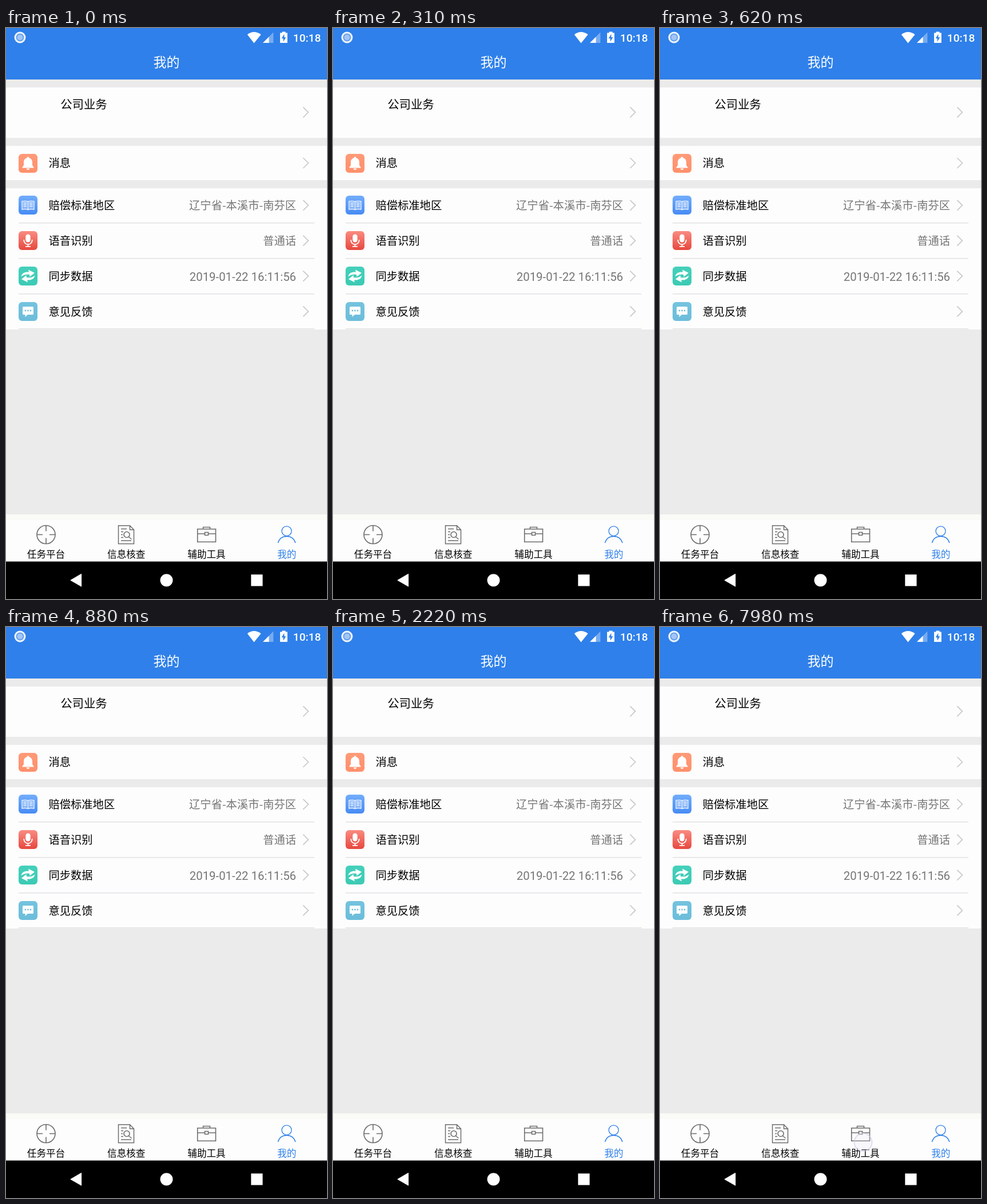
Write an HTML page with a canvas that moves like this. It is 561 px wide and 998 px high and loops after 8000 ms.

```html
<!DOCTYPE html>
<html lang="zh-CN">
<head>
<meta charset="utf-8">
<style>
html, body { margin: 0; width: 100%; height: 100%; overflow: hidden; background: #000; }
canvas { display: block; }
</style>
</head>
<body>
<canvas id="stage" width="561" height="998"></canvas>
<script>
const ctx = document.getElementById('stage').getContext('2d');
const LOOP = 8000;
const CJK = '"Noto Sans CJK SC", "Noto Sans CJK", sans-serif';
const LATIN = 'Roboto, sans-serif';
const BLUE = '#2f80ea', WHITE = '#fdfdfd', GREY = '#ebebeb';

function rect(x, y, w, h, color) {
  ctx.fillStyle = color;
  ctx.fillRect(x, y, w, h);
}

function shape(d, color) {
  ctx.fillStyle = color;
  ctx.fill(new Path2D(d));
}

function line(d, color, width) {
  ctx.strokeStyle = color;
  ctx.lineWidth = width;
  ctx.stroke(new Path2D(d));
}

function disc(x, y, r, color) {
  ctx.beginPath();
  ctx.arc(x, y, r, 0, Math.PI * 2);
  ctx.fillStyle = color;
  ctx.fill();
}

function ring(x, y, r, color, width) {
  ctx.beginPath();
  ctx.arc(x, y, r, 0, Math.PI * 2);
  ctx.strokeStyle = color;
  ctx.lineWidth = width;
  ctx.stroke();
}

function text(str, x, centerY, size, color, align = 'left', family = CJK, weight = 400) {
  ctx.font = `${weight} ${size}px ${family}`;
  ctx.textAlign = align;
  ctx.fillStyle = color;
  ctx.fillText(str, x, centerY + size * (family === CJK ? 0.38 : 0.355));
}

function at(x, y, draw) {
  ctx.save();
  ctx.translate(x, y);
  draw();
  ctx.restore();
}

function statusBar() {
  disc(24.5, 16.5, 10, '#eff5fd');
  disc(24.5, 16.5, 6.9, '#649fef');
  disc(24.5, 16.5, 5, '#a3c5f5');
  shape('M433.5 26.5L421.8 11.6Q427 7 433.5 7T445.6 11.6Z', '#fff');
  shape('M449 26H467.3V7.5Z', 'rgba(255,255,255,.35)');
  shape('M449 26H459.5V15.4Z', '#fff');
  shape('M482.5 6.5H488.5V8.6H491.8V26H479V8.6H482.5Z', '#fff');
  shape('M486.3 10.5L481.6 18.2H484.6V24L489.3 16.3H486.3Z', BLUE);
  text('10:18', 550.3, 17.3, 19.1, '#fff', 'right', LATIN, 500);
}

const icons = {
  bell() {
    shape('M16.5 5Q18.2 5 18.3 7C22.5 8 24 11.5 24 15V20L26.5 23.5V24.5H6.5V23.5L9 20V15C9 11.5 10.5 8 14.7 7Q14.8 5 16.5 5ZM13.5 25.5H19.5Q18.8 28 16.5 28T13.5 25.5Z', '#fff');
  },
  book() {
    const pages = 'M16.5 10.5Q12 8.5 6 10V24Q12 22.8 16.5 24.5Q21 22.8 27 24V10Q21 8.5 16.5 10.5V24.5';
    shape(pages, 'rgba(255,255,255,.25)');
    line(pages + 'M8.5 13H14M8.5 16H14M8.5 19H14M19 13H24.5M19 16H24.5M19 19H24.5', '#e8f1ff', 1.4);
  },
  mic() {
    ctx.beginPath();
    ctx.roundRect(12.3, 5.5, 8.4, 14, 4.2);
    ctx.fillStyle = '#fff';
    ctx.fill();
    line('M9.3 15V16A7.2 7.2 0 0 0 23.7 16V15M16.5 23V26.5M12 26.8H21', '#fff', 1.8);
  },
  sync() {
    const arrow = 'M4.5 17.5C6 11 11 9 18 9.5L17 5.5L28 11L19.5 18L19 14C13 13 9 14 4.5 17.5Z';
    shape(arrow, '#fff');
    ctx.translate(33, 33);
    ctx.rotate(Math.PI);
    shape(arrow, '#fff');
  },
  chat() {
    shape('M8.5 8H24.5Q26 8 26 9.5V20.5Q26 22 24.5 22H16L11.5 26V22H8.5Q7 22 7 20.5V9.5Q7 8 8.5 8Z', '#fff');
    for (const x of [12, 16.5, 21]) disc(x, 15, 1.4, '#70c0dc');
  }
};

const rows = [
  { y: 236, icon: 'bell', from: '#ff9a78', to: '#ff906c', label: '消息' },
  { y: 309.8, icon: 'book', from: '#72adfc', to: '#478bf4', label: '赔偿标准地区', value: '辽宁省-本溪市-南芬区' },
  { y: 371.7, icon: 'mic', from: '#fa8c82', to: '#e6483e', label: '语音识别', value: '普通话' },
  { y: 433.6, icon: 'sync', from: '#45d0bb', to: '#3ccab4', label: '同步数据', value: '2019-01-22 16:11:56', latin: true },
  { y: 495.4, icon: 'chat', from: '#74c3de', to: '#6cbdda', label: '意见反馈' }
];

function chevron(y) {
  line(`M519.3 ${y - 9}L528.4 ${y}L519.3 ${y + 9}`, '#c9c9cc', 1.7);
}

function listRow({ y, icon, from, to, label, value, latin }) {
  at(22, Math.round(y - 16.5), () => {
    const fill = ctx.createLinearGradient(0, 0, 0, 33);
    fill.addColorStop(0, from);
    fill.addColorStop(1, to);
    ctx.beginPath();
    ctx.roundRect(0, 0, 33, 33, 6);
    ctx.fillStyle = fill;
    ctx.fill();
    icons[icon]();
  });
  text(label, 74.5, y, 19.3, '#000');
  if (value) {
    if (latin) text(value, 507, y + 1, 20.35, '#757575', 'right', LATIN);
    else text(value, 507, y, 19.3, '#757575', 'right');
  }
  chevron(y);
}

function tabBar() {
  const ink = '#6c6c6c';
  rect(0, 850, 561, 83, WHITE);
  rect(0, 850, 561, 10, '#fafaf7');
  ring(70, 885.5, 16, ink, 1.6);
  line('M70 869.5V879.5M70 891.5V901.5M54 885.5H64M76 885.5H86', ink, 1.6);
  line('M196.5 869.8H216.5L223.5 877V901.5H196.5ZM216.5 869.8V877H223.5M201 875.5H211M201 880.5H205M201 885.5H204M201 890.5H205M201 896H219M214.5 889.5L219.5 893.5', ink, 1.5);
  ring(211, 885.5, 5, ink, 1.6);
  line('M334.7 875.8H366.5V898.3H334.7ZM344.5 875.8V872.5H356.5V875.8M334.7 884H347.5M353.5 884H366.5M347.5 881.5H353.5V886.5H347.5Z', ink, 1.6);
  ring(490.5, 879.3, 8.5, BLUE, 1.3);
  line('M475.3 900Q478.5 888.5 490.5 888.5T505.9 900', BLUE, 1.3);
  ['任务平台', '信息核查', '辅助工具', '我的'].forEach((label, i) =>
    text(label, 70 + i * 140.25, 919.3, 16.6, i === 3 ? BLUE : '#000', 'center'));
}

function navBar() {
  const back = 'M113.2 965.2L131.5 954.6V975.8Z';
  rect(0, 932.5, 561, 65.5, '#000');
  ctx.lineJoin = 'round';
  shape(back, '#fff');
  line(back, '#fff', 1.2);
  ctx.lineJoin = 'miter';
  disc(280.5, 965.2, 11, '#fff');
  rect(428.3, 955.2, 20.2, 20.2, '#fff');
}

function touch(t) {
  if (t < 7940) return;
  ctx.globalAlpha = t < 7980 ? 1 : 0.65;
  disc(355, 900.5, 16, 'rgba(228,228,246,.35)');
  ring(355, 900.5, 15.5, '#cdcdea', 1.8);
  ctx.globalAlpha = 1;
}

function draw(t) {
  rect(0, 0, 561, 998, GREY);
  rect(0, 0, 561, 90, BLUE);
  statusBar();
  text('我的', 280.5, 59.5, 23, '#fff', 'center');
  rect(0, 104, 561, 88, WHITE);
  rect(0, 206, 561, 60, WHITE);
  rect(0, 280, 561, 247, WHITE);
  text('公司业务', 95.2, 133.7, 20.4, '#000');
  chevron(147.3);
  for (const y of [340, 402, 464, 525]) rect(22, y, 517, 1.5, '#e2e2e5');
  rows.forEach(listRow);
  tabBar();
  navBar();
  touch(t);
}

function frame() {
  draw(performance.now() % LOOP);
  requestAnimationFrame(frame);
}
frame();
</script>
</body>
</html>
```
